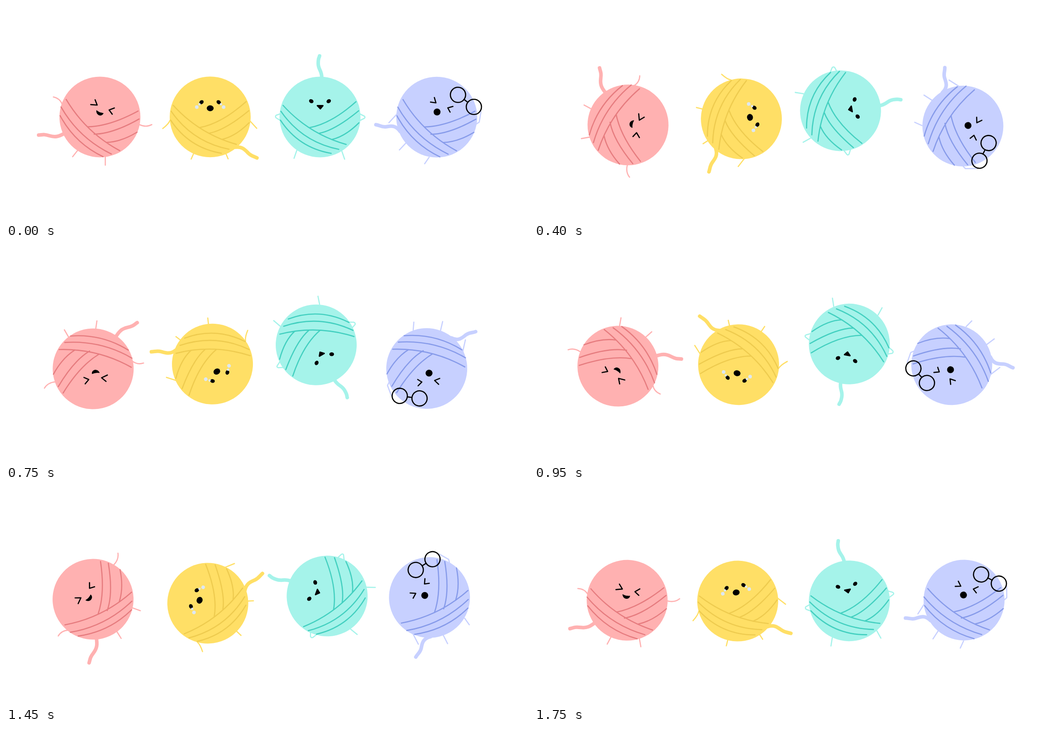
Animation, 1167 px wide and 480 px high, one loop 1800 ms. Source, as an HTML page:

```html
<!DOCTYPE html>
<html lang="en">
<head>
<meta charset="utf-8">
<title>Rolling yarn balls</title>
<style>
  html, body { margin: 0; width: 100%; height: 100%; overflow: hidden; background: #fff; }
  svg { display: block; width: 100%; height: 100%; }

  /* Each ball turns about a point slightly off its centre, 10 degrees every 50 ms. */
  .ball { animation: roll 1.8s steps(36) -10ms infinite; }
  @keyframes roll { from { rotate: 0deg; } to { rotate: 360deg; } }

  .pink   { --wool: #ffb1b1; --strand: #e67c7f; transform-origin: 199.5px 258px; }
  .yellow { --wool: #ffdf66; --strand: #eecb4f; transform-origin: 457.5px 255.2px; }
  .green  { --wool: #a5f3ea; --strand: #43d0c0; transform-origin: 702px 232px; }
  .blue   { --wool: #c7d0ff; --strand: #879bea; transform-origin: 949px 256.8px; }

  path { fill: none; stroke-width: 2.6; stroke-linecap: round; stroke-linejoin: round; }
  .body { fill: var(--wool); }
  .limbs, .tail { stroke: var(--wool); }
  .tail { stroke-width: 8; }
  .strands { stroke: var(--strand); }
  .line { fill: none; stroke: #000; stroke-width: 2.6; }
  .tear { fill: #dde8f4; }
  path.smile { fill: #000; stroke: #000; stroke-width: 1; }
  path.beak { fill: #000; stroke: #000; stroke-width: 3; }
</style>
</head>
<body>
<svg viewBox="0 0 1167 480">
  <defs>
    <circle id="body" r="90.5"/>
    <path id="steep" d="M-75.5-39.5Q-31.5 34.6 44.3 75.5M-87-22.5Q-47.5 47 25.5 83M-89-3Q-56 59 7 89
      M85.3-13.3Q22 21-28 22M87.5 4.5Q28 38-13 38.5M83 34Q47 56 14 57"/>
    <path id="shallow" d="M-82.5-26Q-24.6 38 58.5 61.5M-87.5-13Q-40 56 42 72.5M-88.5 7Q-48 69 25 81.5
      M80.3-34.3Q25 15-24 24M86.5-14Q33 30-2 36.5M87 13Q56 44 26 50.5"/>
  </defs>

  <g class="ball pink" transform="translate(210 249)">
    <path class="tail" d="M-78 36C-92 44-100 46-113 42S-128 40-137 40.5"/>
    <path class="limbs" d="M-104-45C-94-43-88-38-84-28M88 17Q103 24 116 17M-50 75L-61 89M12 88V108"/>
    <use href="#body" class="body"/>
    <use href="#steep" class="strands"/>
    <path class="line" d="M-10.8-38.7L-6.2-26.7L-20.5-27.9M32.3-20.2L20.5-15.8L27.5-6.4"/>
    <path class="smile" d="M-7.6-14.5Q-1-9 7.6-8.3Q5-3-1-4Q-8-6-7.6-14.5Z"/>
  </g>

  <g class="ball yellow" transform="translate(456.5 248.8)">
    <path class="tail" d="M56 68C72 66 78 74 85 81S97 88 104.5 92"/>
    <path class="limbs" d="M-90 8Q-93 16-106 26M89 9L104 25.5M-37 82L-42.5 94.5M35 82L40 94"/>
    <use href="#body" class="body"/>
    <use href="#shallow" class="strands"/>
    <ellipse rx="5.2" ry="4.2" transform="translate(-19.5 -33) rotate(-40)"/>
    <ellipse rx="5.2" ry="4.2" transform="translate(19 -33) rotate(40)"/>
    <ellipse cy="-19.5" rx="7.7" ry="6.6"/>
    <g class="tear">
      <circle cx="-30" cy="-22" r="4"/>
      <circle cx="-24" cy="-28.5" r="2.6"/>
      <circle cx="30" cy="-22" r="4"/>
      <circle cx="24" cy="-28.5" r="2.6"/>
    </g>
  </g>

  <g class="ball green" transform="translate(702 249)">
    <path class="tail" d="M4-88C4-105-4-106-4-120S-2-132-1-137"/>
    <path class="limbs" d="M-89-7L-98-4Q-101-1-98 2L-89 7.5M89-7L99-2Q102 1 99 3L90 7.5M-52 75L-58 92.5M49 77L55 94.5"/>
    <use href="#body" class="body"/>
    <use href="#shallow" class="strands"/>
    <ellipse rx="5.2" ry="4.2" transform="translate(-19.5 -35.5) rotate(30)"/>
    <ellipse rx="5.2" ry="4.2" transform="translate(19.5 -35.5) rotate(-35)"/>
    <path class="beak" d="M-6-25.5H6.5L.8-18.5Z"/>
  </g>

  <g class="ball blue" transform="translate(963 249.3)">
    <path class="tail" d="M-82 32C-92 17-103 20-113 21.5S-128 18-136 17"/>
    <path class="limbs" d="M-89-7L-107 12.5M99-13L95 11L89 15M-69 58L-83.5 73.5M-17 90L-27 104.5"/>
    <use href="#body" class="body"/>
    <use href="#steep" class="strands"/>
    <path class="line" d="M-5.3-44L-1.8-32L-14-33.8M36.2-24L24.7-20.8L29.8-11.3"/>
    <circle cx=".7" cy="-11.5" r="7.7"/>
    <g class="line">
      <circle cx="47.5" cy="-50" r="17"/>
      <circle cx="83" cy="-23" r="17"/>
      <path d="M61-39.7L69.5-33.3"/>
    </g>
  </g>
</svg>
</body>
</html>
```
